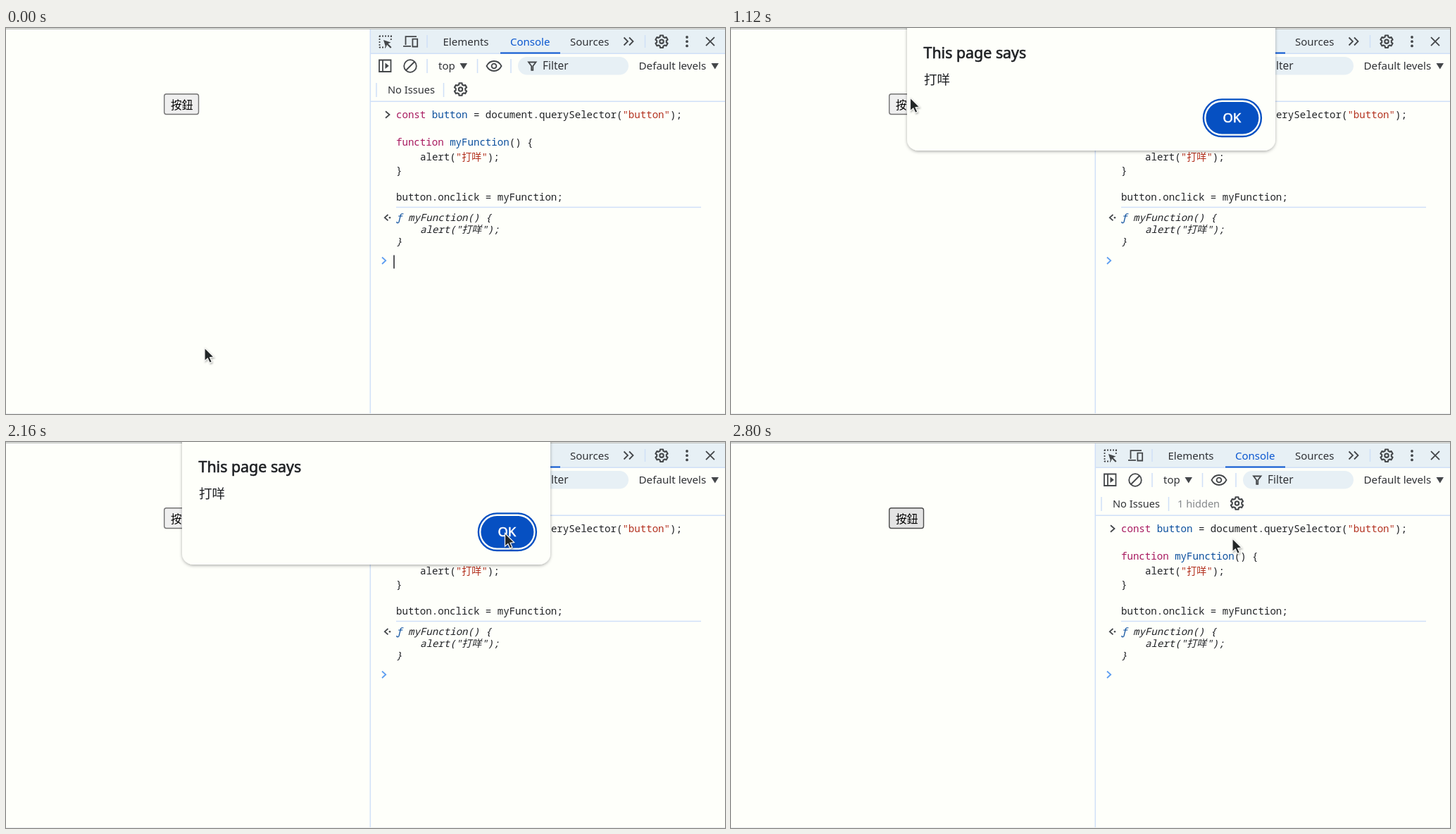
An HTML page that plays this animation: 1021x548 px, repeating every 2880 ms.

```html
<!DOCTYPE html>
<html lang="zh-Hant">
<head>
<meta charset="utf-8">
<title>Button click alert</title>
<style>
  html, body { margin: 0; width: 100%; height: 100%; overflow: hidden; background: #fefffa; }
  svg { display: block; width: 100%; height: 100%; }
  text { font: 15px "Noto Sans", "Noto Sans CJK TC", sans-serif; fill: #303236; white-space: pre; }
  .small { font-size: 14.6px; }
  .code text { font: 14.1px "Noto Sans Mono", "Noto Sans CJK TC", monospace; fill: #202226; }
  .code .result text { font-style: italic; }
  .code .key { fill: #a8195f; }
  .code .name { fill: #0b4f9e; }
  .code .str { fill: #b3311f; }
  .medium { stroke-width: .6; }
  .icon { fill: none; stroke: #44474a; stroke-width: 1.8; }
  .solid { fill: #44474a; stroke: none; }
  .rule { fill: none; stroke: #d0e0f8; stroke-width: 1.5; }
</style>
</head>
<body>
<svg viewBox="0 0 1021 548">
  <defs>
    <g id="gear" class="icon" stroke-linejoin="round">
      <path id="teeth" style="stroke-width:2.1"/>
      <circle r="2.7" style="stroke-width:2.1"/>
    </g>
    <filter id="shadow" x="-10%" y="-10%" width="120%" height="125%">
      <feDropShadow dx="0" dy="1.5" stdDeviation="2" flood-opacity=".32"/>
    </filter>
    <filter id="soft" x="-50%" y="-50%" width="200%" height="200%">
      <feDropShadow dx="1" dy="1.5" stdDeviation="1" flood-opacity=".3"/>
    </filter>
  </defs>

  <rect width="1021" height="548" fill="#fefffa"/>
  <path d="M0 547.5H1021" stroke="#eceeee"/>

  <!-- Page -->
  <rect id="button" x="224.7" y="93.7" width="48.8" height="28.8" rx="3" stroke-width="1.4"/>
  <text x="234" y="114.7" style="font-size:15.7px;fill:#000">按鈕</text>

  <!-- Toolbars -->
  <rect x="518" y="2" width="503" height="34" fill="#e7f0f5"/>
  <path class="rule" d="M517.3 2V547M518 36.2H1021M518 104.3H1021M554 254.5H987"/>
  <path class="rule" d="M598 10V28M907.5 10V28M598 44V64M669.5 44V64M717 44V64M526 78V98M621.5 78V98"/>
  <path d="M0 1.2H1021" stroke="#bfc1c0" stroke-width="1.5"/>
  <path d="M702 35.4H787" stroke="#0b57d0" stroke-width="2"/>

  <text x="620.5" y="24.5">Elements</text>
  <text x="716" y="24.5" style="fill:#0b57d0">Console</text>
  <text x="801" y="24.5">Sources</text>
  <text x="614" y="59">top</text>
  <rect x="727" y="41" width="157" height="25.5" rx="12.7" fill="#e7f0f5"/>
  <text x="762" y="59" style="font-size:15.4px">Filter</text>
  <text x="898.5" y="59" style="font-size:15.2px">Default levels</text>
  <text class="small" x="542" y="92.5">No Issues</text>
  <text class="small" id="hidden" x="634" y="92.5" style="fill:#85888b">1 hidden</text>

  <g class="icon">
    <path d="M530 11.5H548M530 27.5H539M530.5 11V28M546.8 11V19" stroke-dasharray="2 2"/>
    <path class="solid" d="M536 17L546.5 20.5L542.6 22.3L547.5 27.2L546 28.7L541 23.8L539.4 27.7Z"/>
    <path d="M567.5 24V12.2H583M564 25.8H575M577.4 15.7H584.2V26.5H577.4Z"/>
    <path d="M877.5 13.5L883 19L877.5 24.5M885 13.5L890.5 19L885 24.5M994 13.2L1006 25.2M1006 13.2L994 25.2"/>
    <path d="M530 45.5H546.5V62H530ZM535 45.5V62"/>
    <path class="solid" d="M538.5 49.5L543.8 53.8L538.5 58Z"/>
    <circle cx="574" cy="54" r="8.8"/>
    <path d="M568 60L580 48"/>
    <path d="M682.5 54Q686 47 693 47T703.5 54Q700 61 693 61T682.5 54Z"/>
    <circle cx="693" cy="54" r="3.4"/>
    <path d="M742 48.5H752.5L748.3 54V59.8H746.2V54Z"/>
    <path class="solid" d="M644.5 50H655L649.8 58.5ZM1001.5 50H1012L1006.8 58.5Z"/>
    <g class="solid">
      <circle cx="967" cy="13" r="1.9"/><circle cx="967" cy="19.2" r="1.9"/><circle cx="967" cy="25.4" r="1.9"/>
    </g>
  </g>
  <use href="#gear" x="931" y="19.2"/>
  <use href="#gear" id="settings" y="87"/>

  <!-- Console -->
  <g class="code">
    <text x="554" y="128.3"><tspan class="key">const</tspan> <tspan class="name">button</tspan> = document.querySelector(<tspan class="str">"button"</tspan>);</text>
    <text x="554" y="166.6"><tspan class="key">function</tspan> <tspan class="name">myFunction</tspan>() {</text>
    <text x="588" y="187.8">alert(<tspan class="str">"打咩"</tspan>);</text>
    <text x="554" y="207">}</text>
    <text x="554" y="245.3">button.onclick = myFunction;</text>
    <g class="result">
      <text x="554" y="274"><tspan class="name">ƒ</tspan></text>
      <text x="571" y="274">myFunction() {</text>
      <text x="588" y="291">alert("打咩");</text>
      <text x="554" y="308">}</text>
    </g>
  </g>
  <g class="icon">
    <path d="M539 118.3L544.5 123L539 127.7M542.5 265L537.8 269.2L542.5 273.4"/>
    <circle class="solid" cx="545" cy="269.2" r="1.3"/>
    <path d="M534 325.5L539.2 330.2L534 335" style="stroke:#5c9df0"/>
  </g>
  <path id="caret" d="M551 322.5V341.5" stroke="#202226" stroke-width="1.5"/>

  <!-- Alert -->
  <g id="dialog">
    <rect x="250" y="-30" width="523" height="204" rx="16" fill="#fefffa" filter="url(#shadow)"/>
    <text class="medium" x="273.5" y="43" stroke="#1f2124" style="font-size:21.4px;fill:#1f2124">This page says</text>
    <text x="274" y="80.3" style="font-size:18.6px;fill:#1f2124">打咩</text>
    <rect id="ring" x="670.9" y="101.4" width="82" height="52.6" rx="26.3" fill="none" stroke="#0650c2" stroke-width="2.4"/>
    <rect x="674.4" y="105" width="75" height="45.5" rx="22.7" fill="#0650c2"/>
    <text class="medium" x="711.3" y="134.2" text-anchor="middle" stroke="#fff" style="font-size:18.4px;fill:#fff">OK</text>
  </g>

  <path id="cursor" d="M0 0V18.6L4.3 14.9L7.3 21.4L10.4 20L7.5 13.7L13.1 13.1Z" fill="#222527" stroke="#f4f4f2" stroke-width="1.2" filter="url(#soft)"/>
</svg>
<script>
const LOOP = 2880, STEP = 80;
const el = id => document.getElementById(id);

// Each key is [time, ...values].
const cursorKeys = [
  [0, 282, 454], [80, 283, 440], [160, 287, 370], [240, 284, 260], [320, 275, 165],
  [400, 268, 122], [480, 259, 105], [560, 254.5, 99], [1360, 254.5, 99], [1440, 264, 99],
  [1600, 400, 92], [1760, 580, 87], [1920, 670, 93], [2080, 705, 122], [2240, 712, 137]
];
const dialogKeys = [ // opacity, vertical offset
  [880, 0, -22], [960, .03, -21], [1040, .65, -7], [1120, 1, 0],
  [2400, 1, 0], [2480, .4, -10], [2560, .03, -21], [2640, 0, -22]
];

function sample(keys, t) {
  const next = keys.findIndex(key => key[0] > t);
  if (next === 0) return keys[0].slice(1);
  if (next < 0) return keys[keys.length - 1].slice(1);
  const a = keys[next - 1], b = keys[next];
  const p = (t - a[0]) / (b[0] - a[0]);
  return a.slice(1).map((v, i) => v + (b[i + 1] - v) * p);
}

function gearPath() {
  const points = [];
  for (let tooth = 0; tooth < 6; tooth++) {
    for (const [r, offset] of [[9, -13], [9, 13], [6.9, 20], [6.9, 40]]) {
      const a = (tooth * 60 - 90 + offset) * Math.PI / 180;
      points.push(`${(r * Math.cos(a)).toFixed(2)} ${(r * Math.sin(a)).toFixed(2)}`);
    }
  }
  return `M${points.join("L")}Z`;
}

function show(id, visible) {
  el(id).setAttribute("visibility", visible ? "visible" : "hidden");
}

function draw(now) {
  const t = Math.floor(now % LOOP / STEP) * STEP;

  const [x, y] = sample(cursorKeys, t);
  el("cursor").setAttribute("transform", `translate(${x} ${y})`);

  const [opacity, offset] = sample(dialogKeys, t);
  el("dialog").setAttribute("opacity", opacity);
  el("dialog").setAttribute("transform", `translate(0 ${offset})`);

  const hovered = t >= 480 && t < 880 || t >= 2240;
  el("button").setAttribute("fill", hovered ? "#e4e4e4" : "#efefef");
  el("button").setAttribute("stroke", hovered ? "#4c4c4c" : "#737373");

  const logged = t >= 2400;
  show("hidden", logged);
  el("settings").setAttribute("x", logged ? 718.5 : 645.5);
  show("ring", t < 2240);
  show("caret", t < 560);
}

function tick(now) {
  draw(now);
  requestAnimationFrame(tick);
}

el("teeth").setAttribute("d", gearPath());
draw(0);
requestAnimationFrame(tick);
</script>
</body>
</html>
```
